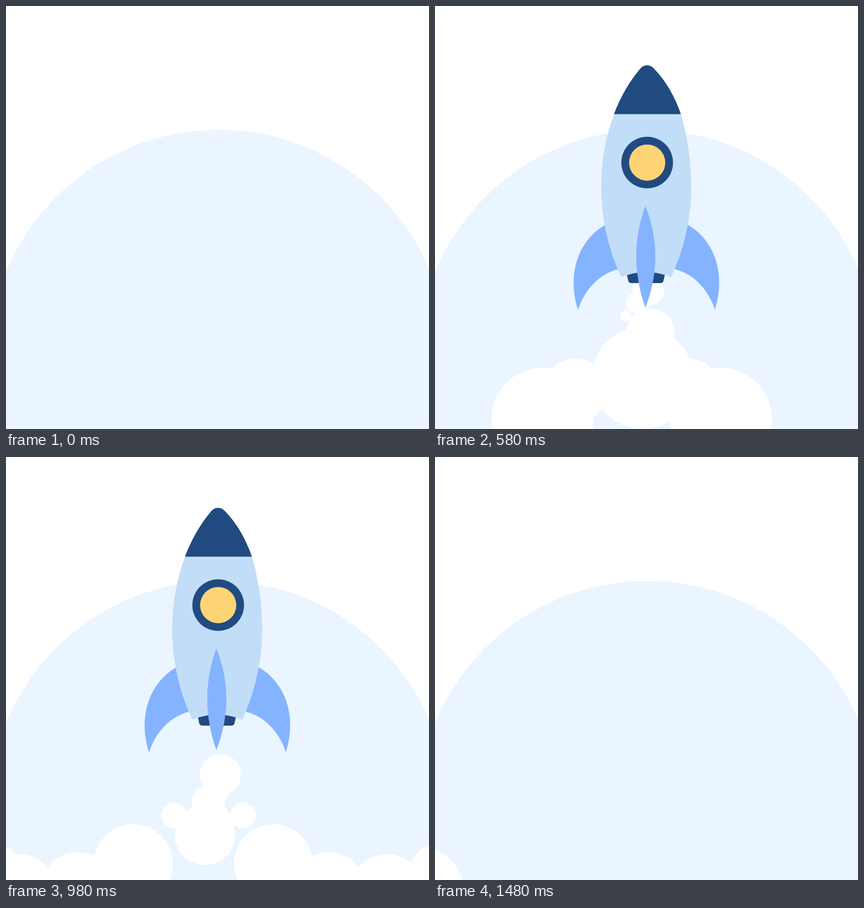
An HTML page with a canvas that plays this animation: 748 px wide and 748 px high, repeating every 1500 ms.

```html
<!DOCTYPE html>
<html lang="en">
<head>
<meta charset="utf-8">
<title>Rocket launch</title>
<style>
  html, body { margin: 0; width: 100%; height: 100%; overflow: hidden; background: #fff; }
  canvas { display: block; width: 748px; height: 748px; }
</style>
</head>
<body>
<canvas id="stage" width="748" height="748"></canvas>
<script>
const ctx = document.getElementById('stage').getContext('2d');
const LOOP = 1500, STEP = 20, SIZE = 748;
const NAVY = '#214b80', BODY = '#c2ddf8', FIN = '#84b3ff', GLASS = '#ffd475', SKY = '#eaf5ff';

// Flight phases: rush in, float up, settle back, blast off
const ENTER = 130, FLOAT = 340, PEAK = 910, BLAST = 1080, GONE = 1200;
const PEAK_Y = 82.5, RISE = 57.5, SETTLE = 19.5;

// Smoke: three bursts, then two moments of clearing
const BURSTS = [580, 840, 1100, 1320, 1480], FADE = 220;
const NOZZLE_X = 374, NOZZLE_DROP = 362;

// Rocket parts, drawn with the nose tip at y = 140
const TIP = 140;
const parts = [
  [FIN, 'M301 422.500C261 445 230.500 500 253 573C264 537 292 508 324 501L340 460Z'],
  [FIN, 'M447 422.500C487 445 517.500 500 495 573C484 537 456 508 424 501L408 460Z'],
  [NAVY, 'M337.500 503L341.800 521.500Q342.700 525.300 346.500 525.300H399.500Q403 525.300 404 521.500L408.300 503Z'],
  [BODY, 'M317 226C301 268 294 310 294 355C294 412 307 468 329.500 515Q373.500 497 417.500 515C440 468 453 412 453 355C453 310 447 268 434.500 226Z'],
  [NAVY, 'M316.500 226.700C327.500 197 344.300 168 362.700 146.500C369.300 138 380.700 138 387.500 146.500C408.700 168 424.700 197 434.800 226.700Z'],
  [FIN, 'M372 389C350.500 448 350.500 508 372 569C395.500 508 395.500 448 372 389Z']
].map(([color, d]) => [color, new Path2D(d)]);

const puffs = [];
const lerp = (a, b, u) => a + (b - a) * u;

// Height of the nose tip
function tipAt(t) {
  if (t < PEAK) {
    const rush = Math.max(0, (FLOAT - t) / (FLOAT - ENTER));
    const float = (PEAK - t) / (PEAK - FLOAT);
    return PEAK_Y + RISE * float ** 1.75 + 610 * rush ** 2;
  }
  const settle = Math.min(1, (t - PEAK) / (BLAST - PEAK));
  const blast = Math.max(0, (t - BLAST) / (GONE - BLAST));
  return PEAK_Y + SETTLE * (1 - Math.cos(Math.PI * settle)) / 2 - 560 * blast ** 3.5;
}

// Each pose is [time, x, y, radius]
function puff(...poses) {
  const [t, x, y] = poses[0], end = poses[poses.length - 1][0];
  const vent = tipAt(t) + NOZZLE_DROP;
  const age = Math.min(230, Math.hypot(x - NOZZLE_X, y - vent) / 1.2);
  const next = BURSTS.find(b => b > end) || LOOP;
  puffs.push({ poses, born: t - age, fadeFrom: end, end: Math.min(end + FADE, next) });
}

// Mirrored puffs; each pose is [time, axis, distance, y, radius]
function pair(...poses) {
  for (const side of [-1, 1]) {
    puff(...poses.map(([t, axis, d, y, r]) => [t, axis + side * d, y, r]));
  }
}

// A big puff with smaller ones stacked above it
function column(t, x, y, lean, caps) {
  puff([t, x, y, 90]);
  for (let i = 0; i < caps; i++) puff([t, x + lean, y - 80 - 48 * i, 43]);
}

// Ground clouds spread in three lanes per side; on the left the outer lanes last longer
function lanes() {
  for (const side of [-1, 1]) {
    for (let k = 0; k < 3; k++) {
      const count = side < 0 ? k + 2 : 3;
      puff(...BURSTS.slice(1, 1 + count).map((t, i) => {
        const n = Math.min(i, 2);
        const x = 345 + 7 * n + side * (113 + 95 * k + n * (20 + 5 * k * k));
        const y = k ? 765 : 703 + 30 * n;
        return [t, x, y, 86 - 18 * k + Math.min(n, 1) * (27 * k - 30)];
      }));
    }
  }
}

const [first, second, third] = BURSTS;
pair([first, 348, 158, 730, 90], [second, 371, 389, 733, 78]);
pair([first, 348, 100, 680, 57]);
column(first, 367, 658, 14, 1);
for (let i = 0; i < 3; i++) puff([first, 377 - 20 * i, 502 + 23 * i, 28 - 9 * i]);

lanes();
column(second, 352, 668, 19, 1);
pair([second, 358, 61, 634, 38]);
puff([second, 358, 610, 50]);

column(third, 419, 676, -32, 2);
puff([third, 276, 662, 32]);
puff([third, 315, 745, 75]);

function disc(x, y, r, color) {
  ctx.fillStyle = color;
  ctx.beginPath();
  ctx.arc(x, y, r, 0, 2 * Math.PI);
  ctx.fill();
}

function drawPuff({ poses, born, fadeFrom, end }, t) {
  if (t <= born || t >= end) return;
  const [t0, x, y, r] = poses[0];
  if (t < t0) {
    // Blown down from the nozzle, then out along the ground
    const u = (t - born) / (t0 - born);
    const vent = tipAt(born) + NOZZLE_DROP;
    disc(lerp(NOZZLE_X, x, u * u), lerp(vent, y, Math.sin(u * Math.PI / 2)), r * lerp(.1, 1, u), '#fff');
  } else if (t >= fadeFrom) {
    const [, x1, y1, r1] = poses[poses.length - 1];
    const u = (t - fadeFrom) / (end - fadeFrom);
    disc(x1, y1, r1 * (1 - u * u), '#fff');
  } else {
    const i = poses.findIndex(p => p[0] > t);
    const a = poses[i - 1], b = poses[i];
    const u = (t - a[0]) / (b[0] - a[0]);
    disc(lerp(a[1], b[1], u), lerp(a[2], b[2], u), lerp(a[3], b[3], u), '#fff');
  }
}

function drawRocket(t) {
  if (t < ENTER || t >= GONE) return;
  ctx.save();
  ctx.translate(0, tipAt(t) - TIP);
  for (const [color, path] of parts) {
    ctx.fillStyle = color;
    ctx.fill(path);
  }
  disc(375.2, 312.3, 45.7, NAVY);
  disc(375.2, 312.3, 32, GLASS);
  ctx.restore();
}

function draw(t) {
  ctx.fillStyle = '#fff';
  ctx.fillRect(0, 0, SIZE, SIZE);
  disc(375.5, 625, 406, SKY);
  for (const p of puffs) drawPuff(p, t);
  drawRocket(t);
}

const start = performance.now();
function tick() {
  const t = (performance.now() - start) % LOOP;
  draw(Math.floor(t / STEP) * STEP);
  requestAnimationFrame(tick);
}
tick();
</script>
</body>
</html>
```
